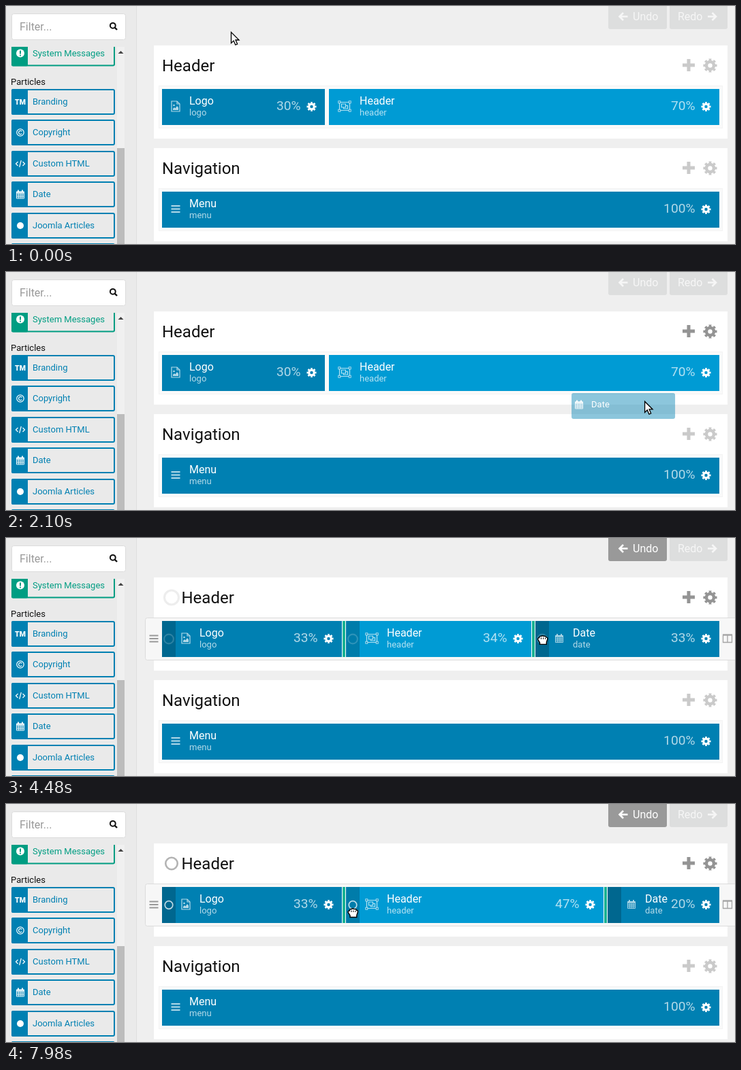
An HTML page for the animation above (8 s loop, 1070 px wide and 350 px high).

```html
<!DOCTYPE html>
<html lang="en">
<head>
<meta charset="utf-8">
<title>Layout manager</title>
<style>
  html, body { margin: 0; width: 100%; height: 100%; overflow: hidden; background: #efefef; }
  svg { display: block; width: 1070px; height: 350px; font-family: Roboto, "Open Sans", sans-serif; }
</style>
</head>
<body>
<svg id="stage" viewBox="0 0 1070 350"></svg>
<script>
const LOOP = 8000, STEP = 70;
const BLUE = '#0080b2', SKY = '#009bd4', TEAL = '#009d82';
const DRAG = 1120, DROP = 2730, SETTLE = 2870, RESIZE = 4410, RELEASE = 7770;
const ROW_X = 229, ROW_W = 818;

// Pointer path: time, x, y
const PATH = [
  [0, 330, 38], [210, 330, 38], [500, 205, 165], [680, 61, 255], [840, 115, 272],
  [1120, 115, 272], [1610, 613, 246], [1890, 835, 215], [2250, 1010, 172],
  [2450, 989, 160], [2730, 989, 160], [3360, 793, 158], [3500, 784, 156],
  [4340, 774, 150], [5180, 855, 149], [5320, 858, 149], [6020, 868, 150],
  [6860, 878, 150], [7700, 893, 150], [7980, 509, 160]
];

function pointer(t) {
  const i = Math.max(1, PATH.findIndex(p => p[0] >= t));
  const [t0, x0, y0] = PATH[i - 1], [t1, x1, y1] = PATH[i];
  const k = (t - t0) / (t1 - t0);
  return [x0 + (x1 - x0) * k, y0 + (y1 - y0) * k];
}

const rect = (x, y, w, h, fill, more = '') =>
  `<rect x="${x}" y="${y}" width="${w}" height="${h}" fill="${fill}" ${more}/>`;
const text = (x, y, size, fill, str, more = '') =>
  `<text x="${x}" y="${y}" font-size="${size}" fill="${fill}" ${more}>${str}</text>`;
const line = (d, color, width = 1, more = '') =>
  `<path d="${d}" fill="none" stroke="${color}" stroke-width="${width}" ${more}/>`;
const ring = (x, y, r, color, width, more = '') =>
  `<circle cx="${x}" cy="${y}" r="${r}" fill="none" stroke="${color}" stroke-width="${width}" ${more}/>`;
const at = (x, y, body, more = '') => `<g transform="translate(${x} ${y})" ${more}>${body}</g>`;

const gear = (x, y, r, color) =>
  ring(x, y, r * .55, color, r * .46) +
  ring(x, y, r * .85, color, r * .32, 'pathLength="16" stroke-dasharray="1.1 .9" stroke-dashoffset=".55"');
const bars = (color, w = 2) => line('M-6.5-4.5H6.5M-6.5 0H6.5M-6.5 4.5H6.5', color, w);

const icons = {
  alert: '<circle r="6" fill="#fff"/>' + line('M0-4V1M0 2.2V4', TEAL, 2),
  tm: text(0, 4, 10.5, '#fff', 'TM', 'font-weight="900" text-anchor="middle"'),
  copy: ring(0, 0, 5.2, '#fff', 1.2) + line('M2.2-1.6A2.6 2.6 0 1 0 2.2 1.6', '#fff', 1.2),
  code: line('M-3.5-3L-6.5 0L-3.5 3M3.5-3L6.5 0L3.5 3M1.3-5L-1.3 5', '#fff', 1.2),
  date: line('M-5.5-4H5.5V6H-5.5ZM-5.5-1.5H5.5M-5.5 1H5.5M-5.5 3.5H5.5M-2.7-1.5V6M0-1.5V6M2.7-1.5V6', '#fff', .9) +
    line('M-5.5-3.2H5.5', '#fff', 1.8) + line('M-3-6.5V-3M3-6.5V-3', '#fff', 1.8),
  dot: '<circle r="5" fill="#fff"/>',
  file: line('M-6-7.5H2L6-3.5V7.5H-6ZM2-7.5V-3.5H6', '#fff', 1.2) +
    '<path d="M-4 5.5V3.5L-2 1.5L-.5 3L2-.5L4 2V5.5Z" fill="#fff"/><circle cx="-2.5" cy="-1.5" r="1.3" fill="#fff"/>',
  group: line('M-7.5-6H7.5V6H-7.5ZM-4.5-3.5H1.5V1.5H-4.5ZM1.5-1H4.5V3.5H-1.5V1.5', '#fff', 1.2) +
    [[-1, -1], [1, -1], [-1, 1], [1, 1]].map(([a, b]) =>
      rect(a * 7.7 - 1.5, b * 6.2 - 1.5, 3, 3, BLUE, 'stroke="#fff"')).join(''),
  menu: bars('#fff', 1.8)
};

const PARTICLES = [['Branding', 'tm'], ['Copyright', 'copy'], ['Custom HTML', 'code'],
  ['Date', 'date'], ['Joomla Articles', 'dot'], ['', '']];

function item(y, label, icon, color) {
  return rect(9, y + 1, 150, 36, 'none', `rx="2" stroke="${color}" stroke-width="2"`) +
    rect(8, y, 24, 38, color, 'rx="2"') + at(21, y + 19, icons[icon] || '') +
    text(39, y + 23, 13, color, label);
}

const sidebar = rect(0, 0, 191, 350, '#eaeaea') + rect(191, 0, 1, 350, '#dedede') +
  item(50.5, 'System Messages', 'alert', TEAL) +
  rect(0, 0, 190, 60, '#eaeaea') +
  rect(8.5, 11.5, 167, 38, '#fff', 'rx="3" stroke="#dcdcdc"') +
  text(20, 36, 16, '#999', 'Filter...') +
  ring(156.8, 28.8, 3.9, '#111', 2) + line('M159.6 31.6L163 35', '#111', 2.4) +
  text(7, 116, 13, '#111', 'Particles') +
  PARTICLES.map(([name, icon], i) => item(122 + Math.round(i * 45.4), name, icon, BLUE)).join('') +
  rect(163, 60, 11, 290, '#f0f0f0') + rect(163, 209, 11, 141, '#bcbcbc') +
  '<path d="M164.5 70L168.5 66L172.5 70Z" fill="#444"/>';

function button(x, w, label, tx, ax, dir, active) {
  const ink = active ? '#fff' : '#f6f6f6';
  return rect(x, -4, w, 38, active ? '#999' : '#dddede', 'rx="3"') + text(tx, 21, 16, ink, label) +
    at(ax, 15.5, line('M-6 0H6M.5-5.5L6 0L.5 5.5', ink, 2.6), `transform-origin="0 0"`)
      .replace(')"', `) scale(${dir} 1)"`);
}

function section(y, title, hover, pulse) {
  const ink = hover ? '#949494' : '#cacaca';
  return rect(217, y, 842, 137, '#fff') +
    text(pulse ? 257.5 : 229, y + 38, 24, '#111', title) +
    (pulse ? indicator(243, y + 29.5, 1, '#999', pulse) : '') +
    line(`M993 ${y + 29}H1011M1002 ${y + 20}V${y + 38}`, ink, 5) + gear(1033.5, y + 29.5, 10, ink);
}

function indicator(x, y, scale, color, { size, alpha }) {
  const r = (5 + 5.6 * size) * scale;
  return ring(x, y, r, color, r * .3, `opacity="${alpha}"`);
}

function pulseAt(t) {
  const p = (t - 330) / 2200 % 1;
  const alpha = p < .2 ? p / .2 : 1 - ((p - .2) / .8) ** 1.3;
  return { size: 1 - (1 - p) ** 1.7, alpha };
}

// A block spans from x to end; pulse marks it as changed
function block(x, end, y, name, icon, pct, pulse) {
  const wide = icon === 'group', shift = pulse ? 15 : 0;
  return rect(x, y, end - x, 53, wide ? SKY : BLUE) +
    (pulse ? rect(x, y, 20, 53, '#000', 'opacity=".2"') + indicator(x + 10, y + 26.5, .66, '#fff', pulse) : '') +
    at(x + shift + (wide ? 23 : 20), y + 25.5, icons[icon], 'opacity=".7"') +
    text(x + shift + (wide ? 45 : 40), y + 23, 16, '#fff', name) +
    text(x + shift + (wide ? 45 : 40), y + 39, 13, '#fff', name.toLowerCase(), 'opacity=".7"') +
    text(end - 35.5, y + 31, 19.2, '#fff', pct, 'text-anchor="end" opacity=".7"') +
    gear(end - 19.5, y + 26, 7, '#fff');
}

function frame(y) {
  return rect(224.5, y - 4.5, 827, 62, '#fafafa', 'stroke="#f3f3f3"');
}

function activeFrame(fresh) {
  const tint = fresh ? '#c58a7c' : '#a5a5a5';
  return rect(204.5, 117.5, 868, 62, '#f7f7f7', 'rx="3" stroke="#dcdcdc"') +
    at(217, 148, bars('#999')) +
    line('M1052.5 142.5H1065.5V153.5H1052.5ZM1059 142V154', tint, 1.3) + line('M1052 142.5H1066', tint, 2.2);
}

function headerRow(t, x, pulse) {
  const names = [['Logo', 'file'], ['Header', 'group'], ['Date', 'date']];
  let shares = [30, 70], labels = ['30%', '70%', ''];
  if (t >= DROP) shares = [22.5, 52.5, 25];
  if (t >= SETTLE) {
    shares = [100 / 3, 100 / 3, 100 / 3];
    labels = Array(3).fill('33.3%');
  }
  if (t >= RESIZE) {
    const mid = t < RELEASE ? Math.round((x - 506) / 8.18) : 47;
    shares = [33, mid, 67 - mid];
    labels = shares.map(s => s + '%');
  }
  let out = t >= DROP ? activeFrame(t < SETTLE) : frame(122), left = ROW_X;
  shares.forEach((share, i) => {
    const next = left + share / 100 * ROW_W, last = i === shares.length - 1;
    const start = Math.round(left), end = Math.round(next) - (last ? 0 : 6);
    const mark = pulse && i === 2 && t >= RELEASE ? { size: 0, alpha: 0 } : pulse;
    out += block(start, end, 122, ...names[i], labels[i], mark);
    if (!last && t >= DROP) out += rect(end, 122, 6, 53, '#fff') + rect(end + 1, 122, 4, 53, '#18b293');
    left = next;
  });
  return out;
}

const ghost = (x, y) => at(x - 107, y - 12,
  rect(0, 0, 152, 38, BLUE, 'rx="3" opacity=".45"') + at(11, 17, icons.date) + text(29, 21, 13, '#fff', 'Date'));

const arrow = '<path d="M.5.5V16.5L4.2 13L6.8 19.2L9.6 18L7 12H12Z" fill="#fff" stroke="#000" stroke-width="1.3"/>';
const fist = '<path d="M-7-1Q-7-3.2-4.8-3Q-4.6-6-2-5.3Q0-7 2-5.3Q4.6-6.3 5-4Q7.8-4 7.3-1L5.8 3.5V6.5H-4V4Z" fill="#fff" stroke="#000" stroke-width="1.4"/>' +
  line('M-2-3.5V-1M1-3.5V-1M4-3V-1', '#000');

function scene(t) {
  const [x, y] = pointer(t), pulse = t >= SETTLE && pulseAt(t);
  const over = top => x > 217 && y >= top && y <= top + 137;
  return sidebar +
    button(884, 86, 'Undo', 920, 906.5, -1, t >= SETTLE) + button(974, 85, 'Redo', 986, 1036, 1, false) +
    section(58, 'Header', over(58), pulse) + headerRow(t, x, pulse) +
    section(209, 'Navigation', over(209)) + frame(273) + block(229, 1047, 273, 'Menu', 'menu', '100%') +
    (t >= DRAG && t < DROP ? ghost(x, y) : '') + at(x, y, t < DROP ? arrow : fist);
}

const stage = document.getElementById('stage');
let shown = -1;
function tick() {
  const t = Math.floor(performance.now() % LOOP / STEP) * STEP;
  if (t !== shown) stage.innerHTML = scene(shown = t);
  requestAnimationFrame(tick);
}
tick();
</script>
</body>
</html>
```
